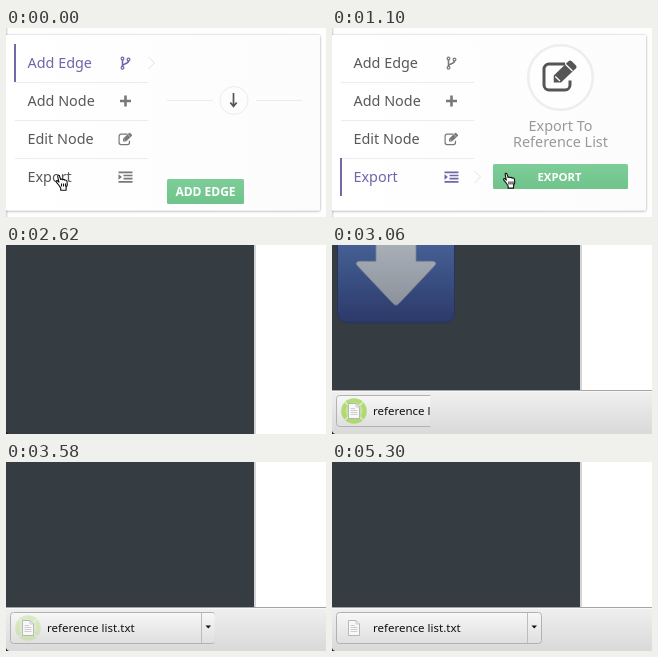
Recreate the animation shown at these times as an HTML page. Size 320x189 px, loop 8400 ms.

```html
<!DOCTYPE html>
<html lang="en">
<head>
<meta charset="utf-8">
<title>Export a reference list</title>
<style>
  html, body { margin: 0; width: 100%; height: 100%; overflow: hidden; background: #fff; }
  svg { display: block; width: 100%; height: 100%; }
  text { font-family: "Noto Sans", "Open Sans", sans-serif; }
  .label { font-size: 14.4px; }
  .caption { font-size: 14.4px; fill: #999; text-anchor: middle; }
  .button { font-weight: 700; fill: #fff; text-anchor: middle; }
  .line { fill: none; stroke: currentColor; }
  .rule { fill: none; stroke: #ececec; }
</style>
</head>
<body>
<svg viewBox="0 0 320 189" preserveAspectRatio="none">
  <defs>
    <linearGradient id="panelFill"><stop stop-color="#fff"/><stop offset="1" stop-color="#fcfcfc"/></linearGradient>
    <linearGradient id="green" x2="0" y2="1"><stop stop-color="#7dcd98"/><stop offset="1" stop-color="#70c38b"/></linearGradient>
    <linearGradient id="shelfFill" x2="0" y2="1"><stop stop-color="#f0f0f0"/><stop offset="1" stop-color="#d9d9d9"/></linearGradient>
    <linearGradient id="itemFill" x2="0" y2="1"><stop stop-color="#f7f7f7"/><stop offset="1" stop-color="#dfdfdf"/></linearGradient>
    <linearGradient id="blue" x2="0" y2="1"><stop stop-color="#5474ae"/><stop offset="1" stop-color="#2b3a69"/></linearGradient>
    <linearGradient id="silver" x2="0" y2="1"><stop stop-color="#b4bac2"/><stop offset="1" stop-color="#8d949d"/></linearGradient>
    <filter id="shadow" x="-5%" y="-5%" width="110%" height="112%">
      <feDropShadow dx="0" dy="0.5" stdDeviation="1.3" flood-color="#000" flood-opacity=".42"/>
    </filter>
    <clipPath id="contentClip"><rect id="contentBox" width="320" height="145"/></clipPath>
    <clipPath id="itemClip"><rect id="itemBox" y="2" height="40"/></clipPath>
    <g id="fork" class="line" stroke-width="1.2">
      <circle cx="-3" cy="-4.5" r="1.4"/><circle cx="3" cy="-3.5" r="1.4"/><circle cx="-3" cy="4.7" r="1.4"/>
      <path d="M-3-3V3.3M3-2C3 1.2-3 .2-3 3.2" stroke-width="1.6"/>
    </g>
    <path id="plus" class="line" stroke-width="2.6" d="M-5.5 0H5.5M0-5.5V5.5"/>
    <g id="edit">
      <path class="line" stroke-width="1.2" d="M4 1.8V3.6a2 2 0 0 1-2 2H-4.4a2 2 0 0 1-2-2V-2.8a2 2 0 0 1 2-2H2"/>
      <path fill="currentColor" d="M-2.5 2.6V-.2L3.5-6 Q4.1-6.4 4.6-6L6.4-4.2Q6.9-3.6 6.4-3.1L.4 2.6Z"/>
      <path d="M2.2-4.7L5-2M-1.9.2L0 2" stroke="#fff" stroke-width=".5"/>
    </g>
    <g id="indent">
      <path class="line" stroke-width="1.7" d="M-7-4.7H7M-2-1.5H7M-2 1.6H7M-7 4.8H7"/>
      <path fill="currentColor" d="M-7-2.8L-3.6 0-7 2.8Z"/>
    </g>
  </defs>

  <g id="menuScene">
    <rect width="320" height="189" fill="#fefefe"/>
    <rect width="1.5" height="189" fill="#ddd"/>
    <rect x="-8" y="7" width="322" height="175.5" rx="1.5" fill="url(#panelFill)" filter="url(#shadow)"/>
    <path class="rule" d="M9 54.5H142M9 92.5H142M9 130.5H142"/>
    <g id="rows"></g>
    <g id="edgePane">
      <path class="rule" d="M161 72.5H207M250 72.5H296"/>
      <circle class="rule" cx="228" cy="72.5" r="14"/>
      <path d="M227.5 65V78M224.3 74.5L227.5 78.4 230.7 74.5" fill="none" stroke="#555" stroke-width="1.7"/>
      <rect x="161" y="151" width="77" height="25" rx="1.5" fill="url(#green)"/>
      <text class="button" x="199.5" y="168" font-size="12">ADD EDGE</text>
    </g>
    <g id="exportPane">
      <circle cx="228.5" cy="49.5" r="32.3" fill="#fefefe" stroke="#eee" stroke-width="2.6"/>
      <use href="#edit" transform="translate(228 48) scale(2.5)" color="#555"/>
      <text class="caption" x="228.5" y="103">Export To</text>
      <text class="caption" x="228.5" y="119">Reference List</text>
      <rect x="161" y="136" width="135" height="25" rx="1.5" fill="url(#green)"/>
      <text class="button" x="227.5" y="153" font-size="11.3">EXPORT</text>
    </g>
    <path id="hand" fill="#fff" stroke="#111" stroke-width="1.1" stroke-linejoin="round"
      d="M3.2 10.5L.8 7.6Q.2 6 1.8 6.1L3.4 7.7 2.2 2Q2.3.2 3.8 1L5.2 5Q6.2 4 7 5.2 8.3 4.3 9.2 5.7 10.8 5 11.5 6.8L11.8 10.5 10.6 13V15.7H5.2V13.6Z M6 9V12M8 9V12M10 9V12"/>
  </g>

  <g id="browserScene">
    <rect width="320" height="189" fill="#fff"/>
    <rect width="248" height="189" fill="#353c42"/>
    <rect x="248" width="2" height="189" fill="#d2d4d5"/>
    <g clip-path="url(#contentClip)">
      <g id="arrow">
        <rect x="5.5" y="-117.5" width="117" height="117" rx="10" fill="url(#blue)" stroke="#27345d"/>
        <path d="M46-98H82Q84-98 84-96V-62H101Q106-61 102-57L67-20Q64-16.500 61-20L26-57Q22-61 27-62H44V-96Q44-98 46-98Z" fill="url(#silver)" stroke="#7f8792" stroke-width=".8"/>
      </g>
    </g>
    <g id="shelf">
      <rect width="320" height="44" fill="url(#shelfFill)"/>
      <path d="M0 .5H320" stroke="#a5a5a5"/>
      <path d="M0 1.500H320" stroke="#f8f8f8"/>
      <g clip-path="url(#itemClip)">
        <rect x="4.500" y="5.500" width="205" height="31" rx="3" fill="url(#itemFill)" stroke="#b2b2b2"/>
        <path d="M195.500 6V36" stroke="#bcbcbc"/>
        <path d="M199.500 18.500H205L202.250 21.500Z" fill="#111"/>
        <g id="pulse">
          <circle cx="22" cy="21" r="12.800" fill="#9fd54f"/>
          <circle cx="22" cy="21" r="8.500" fill="#bce184"/>
          <path d="M13 12L17 16M31 12L27 16M13 30L17 26M31 30L27 26" stroke="#d9efb8" stroke-width="1.500"/>
        </g>
        <path d="M16.500 13.500H24L27.500 17V28.500H16.500Z" fill="#f8f8f8" stroke="#aaa" stroke-width=".8"/>
        <path d="M24 13.500V17H27.500M18.500 18.500H23M18.500 20.500H25.500M18.500 22.500H25.500M18.500 24.500H25.500" fill="none" stroke="#bbb" stroke-width=".7"/>
        <text x="41" y="25" font-size="11.5" font-weight="500" fill="#111">reference list.txt</text>
      </g>
    </g>
    <path d="M0 186Q.5 188.500 3 189H0Z" fill="#111"/>
  </g>
</svg>
<script>
  const LOOP = 8400, CUT = 2620, DOWNLOAD = 2800;
  const GREY = [88, 88, 88], ICON_GREY = [120, 120, 120], PURPLE = [112, 100, 170];
  const $ = id => document.getElementById(id);
  const set = (el, attrs) => { for (const key in attrs) el.setAttribute(key, attrs[key]); };
  const ramp = (t, from, to) => Math.min(1, Math.max(0, (t - from) / (to - from)));
  const easeOut = p => 1 - (1 - p) ** 2;
  const easeInOut = p => p * p * (3 - 2 * p);
  const mix = (a, b, p) => `rgb(${a.map((v, i) => Math.round(v + (b[i] - v) * p))})`;

  const items = [["Add Edge", "fork"], ["Add Node", "plus"], ["Edit Node", "edit"], ["Export", "indent"]];
  $("rows").innerHTML = items.map(([label, icon], i) => `
    <g transform="translate(0 ${35 + 38 * i})">
      <g class="mark">
        <rect x="8" y="-19" width="2" height="38" fill="#7468a8"/>
        <path d="M142.500 -6L148.500 0 142.500 6" fill="none" stroke="#e2e2e2"/>
      </g>
      <text class="label" x="21.500" y="5">${label}</text>
      <use href="#${icon}" x="119.500" y="0"/>
    </g>`).join("");
  const rows = [...$("rows").children];

  function drawRow(row, active) {
    set(row.querySelector(".mark"), { opacity: active });
    set(row.querySelector("text"), { fill: mix(GREY, PURPLE, active) });
    set(row.querySelector("use"), { color: mix(ICON_GREY, PURPLE, active) });
  }

  function drawMenu(t) {
    const chosen = ramp(t, 150, 300) * (t >= 180);
    rows.forEach((row, i) => drawRow(row, i === 0 ? 1 - chosen : i === 3 ? chosen : 0));
    set($("edgePane"), { opacity: 1 - chosen });
    set($("exportPane"), { opacity: chosen });

    const across = easeInOut(ramp(t, 500, 1220));
    const leave = ramp(t, 1830, 1980);
    const x = 49.500 + 131 * across + 10 * leave;
    const y = 146.500 - across + 2.500 * Math.sin(2 * Math.PI * across) + 44 * leave ** 1.5;
    set($("hand"), { transform: `translate(${x} ${y})` });
  }

  function drawDownload(t) {
    const shelfTop = 189 - 44 * easeOut(ramp(t, DOWNLOAD - 30, DOWNLOAD + 120)) * (t >= DOWNLOAD);
    set($("shelf"), { transform: `translate(0 ${shelfTop})` });
    set($("contentBox"), { height: shelfTop });

    const fall = ramp(t, DOWNLOAD, DOWNLOAD + 600);
    set($("arrow"), {
      transform: `translate(0 ${shelfTop - 118 * (1 - fall)})`,
      opacity: 1 - 4 * (fall - 0.5) ** 2
    });
    set($("itemBox"), { width: 4 + 206 * easeOut(ramp(t, 2850, 3650)) });

    const glow = 0.5 + 0.5 * Math.cos(2 * Math.PI * (t - 2900) / 1000);
    set($("pulse"), { opacity: t < 5300 ? glow : 0 });
  }

  function render(t) {
    const menu = t < CUT;
    $("menuScene").style.display = menu ? "" : "none";
    $("browserScene").style.display = menu ? "none" : "";
    (menu ? drawMenu : drawDownload)(t);
  }

  const start = performance.now();
  function tick() {
    render((performance.now() - start) % LOOP);
    requestAnimationFrame(tick);
  }
  tick();
</script>
</body>
</html>
```
